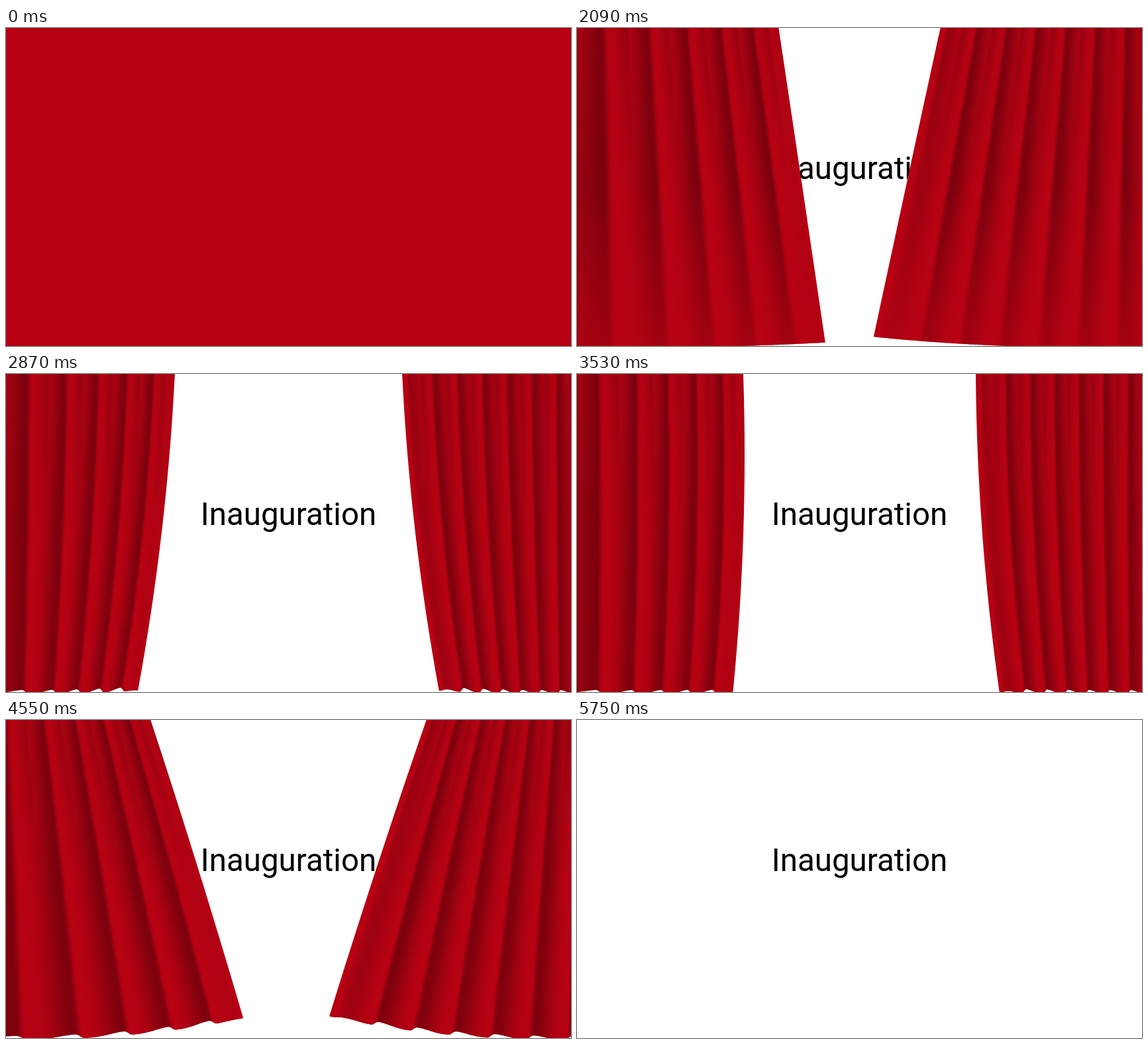
Write an HTML page with a canvas that moves like this. It is 853 by 480 pixels and loops after 7820 ms.

```html
<!DOCTYPE html>
<html lang="en">
<head>
<meta charset="utf-8">
<title>Inauguration</title>
<style>
  html, body { margin: 0; width: 100%; height: 100%; overflow: hidden; background: #fff; }
  svg, canvas { position: absolute; left: 0; top: 0; display: block; }
  text { font: 47.5px Roboto, Arial, sans-serif; text-anchor: middle; }
</style>
</head>
<body>
<svg width="853" height="480"><text x="426.5" y="228">Inauguration</text></svg>
<canvas width="853" height="480"></canvas>
<script>
const W = 853, H = 480, LOOP = 7820, STEP = 60;
const OPEN = 1130, PULL = 4070, GONE = 5750;
const CLOSED_X = 427, DRAWN_X = 251, HEM = 483;
const RED = [182, 2, 19], STRIPS = 140, ROWS = 16;
const ctx = document.querySelector('canvas').getContext('2d');

const left = { swing: 200, period: 2600, folds: 5.2, bunching: 1.3, offset: .65 };
const right = { swing: 245, period: 2800, folds: 6.8, bunching: 1, offset: .45 };

const progress = (t, from, to) => Math.min(1, Math.max(0, (t - from) / (to - from)));
const smooth = s => s * s * (3 - 2 * s);
const red = dark => `rgb(${RED.map(c => Math.round(c * (1 - dark)))})`;

// The rail draws the top aside, the cloth swings below it, then all is pulled off stage.
function edgeAt({ swing, period }, t) {
  const opening = Math.sin(Math.PI / 2 * progress(t, OPEN - STEP, 3150));
  const pull = progress(t, PULL, GONE);
  const since = t - 1100;
  const top = CLOSED_X + (DRAWN_X - CLOSED_X) * opening - 400 * pull ** 2;
  const sway = swing * Math.exp(-since / 1500) * Math.sin(2 * Math.PI * since / period)
    + 200 * Math.sin(2.3 * pull);
  const bow = 8 * (smooth(progress(t, 2000, 2900)) - 2.6 * pull);
  return u => Math.min(CLOSED_X, top + sway * u + bow * 4 * u * (1 - u));
}

// Darkens slowly towards each crease, then brightens quickly.
function pleat(phase) {
  const r = phase - Math.floor(phase);
  return r < .15 ? 1 - smooth(r / .15) : smooth((r - .15) / .85) ** 1.5;
}

function drawCurtain(curtain, t) {
  const edge = edgeAt(curtain, t), top = edge(0);
  const outer = Math.min(0, top - DRAWN_X);
  const lift = (edge(1) - top) ** 2 / 600;
  const depth = .32 * smooth(progress(t, OPEN, 1950));
  const lower = .35 + .6 * smooth(progress(t, 2000, 2800));
  const scallop = 6 * smooth(progress(t, 2200, 2850));

  const phase = v => curtain.folds * v ** curtain.bunching + curtain.offset;
  const shade = v => pleat(phase(v)) * Math.min(1, 8 * (1 - v));
  const hem = v => HEM - lift * v ** 2.5 - scallop * shade(v);

  for (let i = 0; i < STRIPS; i++) {
    const v0 = Math.max(0, i / STRIPS - .004), v1 = (i + 1) / STRIPS;
    const mid = (i + .5) / STRIPS;
    const main = depth * shade(mid), fine = depth * pleat(2 * phase(mid));
    const fill = ctx.createLinearGradient(0, 0, 0, H);
    fill.addColorStop(0, red(.6 * main + .4 * fine));
    fill.addColorStop(.5, red(main));
    fill.addColorStop(1, red(main * lower));
    ctx.fillStyle = fill;
    ctx.beginPath();
    const point = (v, u) => ctx.lineTo(outer + v * (edge(u) - outer), hem(v) * u);
    for (let k = 0; k <= ROWS; k++) point(v0, k / ROWS);
    for (let k = ROWS; k >= 0; k--) point(v1, k / ROWS);
    ctx.fill();
  }
}

function draw(t) {
  ctx.clearRect(0, 0, W, H);
  if (t >= GONE) return;
  if (t < OPEN) {
    ctx.fillStyle = red(0);
    ctx.fillRect(0, 0, W, H);
  } else {
    const step = OPEN + STEP * Math.floor((t - OPEN) / STEP);
    drawCurtain(left, step);
    ctx.save();
    ctx.translate(W, 0);
    ctx.scale(-1, 1);
    drawCurtain(right, step);
    ctx.restore();
  }
  if (t < OPEN + STEP) {
    ctx.fillStyle = red(.15);
    ctx.fillRect(0, H - 1, W, 1);
  }
}

const start = performance.now();
function tick() {
  draw((performance.now() - start) % LOOP);
  requestAnimationFrame(tick);
}
tick();
</script>
</body>
</html>
```
